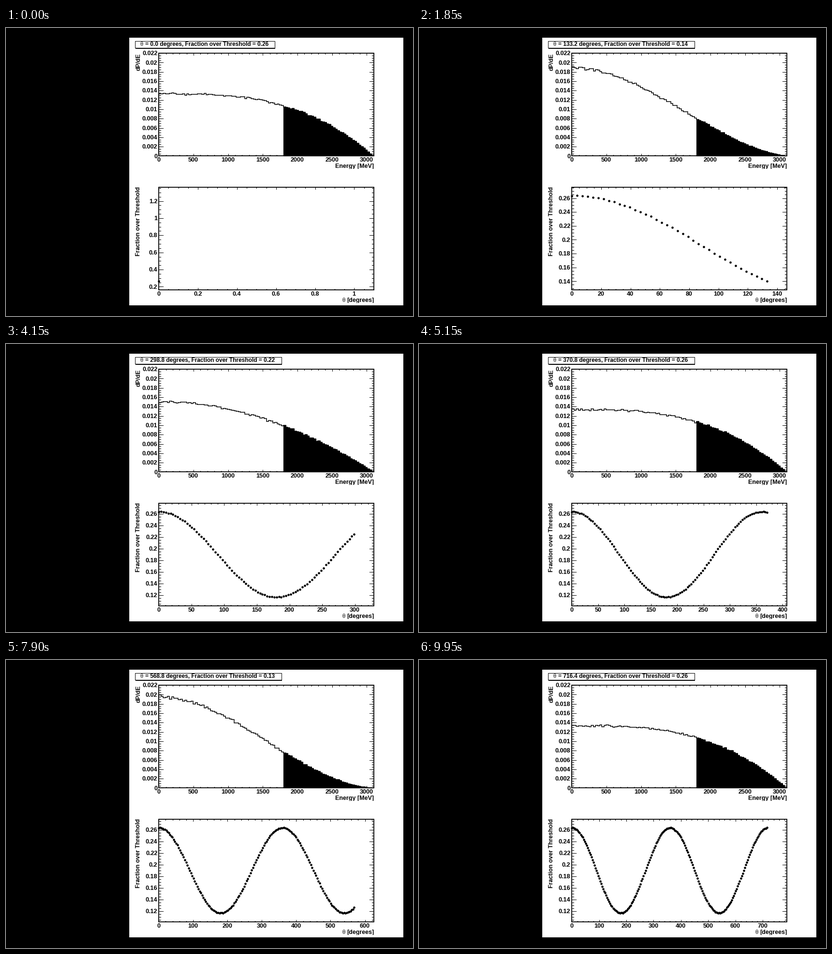
These frames come from a looping animation (842 px wide and 595 px high, 10000 ms). A matplotlib script:

```python
import math

import matplotlib.pyplot as plt
import numpy as np
from matplotlib.animation import FuncAnimation
from matplotlib.collections import LineCollection
from matplotlib.patches import Rectangle

W, H, DPI = 842, 595, 100
FRAMES, INTERVAL = 200, 50
STEP_DEG = 3.6

LEFT, RIGHT = 316.24, 760.76
TOP_PLOT = (52.07, 264.42)      # top and bottom edge in pixels
LOW_PLOT = (328.57, 540.93)

E_AXIS, E_END, P_AXIS = 3100, 3094, 0.022
BINS, FIRST_FILLED = 100, 58
EVENTS = 1e6


def px(size):
    """Pixels to points."""
    return size * 72 / DPI


def nice_ticks(lo, hi, wanted):
    """Round step of 1, 2 or 5 times a power of ten, and its multiples in range."""
    n = wanted
    while True:
        raw = (hi - lo) / n
        power = 10.0 ** math.floor(math.log10(raw) + 1e-9)
        lead = next(m for m in (1, 2, 5, 10) if raw / power <= m + 1e-6)
        step = lead * power
        bins = int(hi / step + 1.00001) - int(lo / step)
        if wanted <= 5 or 2 * bins != wanted:
            break
        n += 1
    return step, multiples(lo, hi, step)


def multiples(lo, hi, step):
    first = math.ceil(lo / step - 1e-6)
    last = math.floor(hi / step + 1e-6)
    return [i * step for i in range(first, last + 1)]


def all_ticks(lo, hi):
    step, major = nice_ticks(lo, hi, 10)
    sub, _ = nice_ticks(0, step, 5)
    return major, multiples(lo, hi, sub)


def scale(v, lo, hi, a, b):
    return a + (b - a) * (np.asarray(v) - lo) / (hi - lo)


# Physics: decay spectrum whose asymmetry follows the cosine of the angle
angles = STEP_DEG * np.arange(FRAMES)
wobble = np.sin(2.3 * np.arange(FRAMES) ** 2)
fractions = 0.19 + 0.0735 * np.cos(np.radians(angles)) + 0.0005 * wobble


def spectrum(k):
    y = np.minimum((np.arange(BINS) + 0.5) * E_AXIS / BINS / E_END, 1)
    flat = 5 / 3 - 3 * y**2 + 4 / 3 * y**3
    skew = 1 / 3 - 3 * y**2 + 8 / 3 * y**3
    p = (flat - math.cos(math.radians(angles[k])) * skew) / BINS
    p = np.maximum(p, 0)
    noise = np.random.default_rng(k).normal(size=BINS)
    return np.maximum(p + noise * np.sqrt(p / EVENTS), 0)


fig = plt.figure(figsize=(W / DPI, H / DPI), dpi=DPI, facecolor="black")
ax = fig.add_axes([0, 0, 1, 1])
ax.set_xlim(0, W)
ax.set_ylim(H, 0)
ax.axis("off")


def box(x0, y0, x1, y1, face, edge="none", width=0, z=1):
    patch = Rectangle((x0, y0), x1 - x0, y1 - y0, facecolor=face,
                      edgecolor=edge, linewidth=px(width), zorder=z)
    return ax.add_patch(patch)


def label(x, y, text, ha="left", size=12.5, **kw):
    style = dict(family="Liberation Sans", weight="bold", va="baseline", zorder=4)
    style.update(kw)
    return ax.text(x, y, text, ha=ha, fontsize=px(size), color="black", **style)


def theta(x, y, size=12.5):
    return label(x, y, "θ", size=size, family="Liberation Serif", weight="normal")


def side_title(y, text):
    label(277, y, text, "right", rotation=90, rotation_mode="anchor")


class Axes:
    """Frame, ticks on all four sides and number labels of one plot."""

    def __init__(self, top, bottom):
        self.top, self.bottom = top, bottom
        self.texts = []
        self.ticks = LineCollection([], colors="black", linewidths=px(1),
                                    antialiaseds=False, zorder=3)
        ax.add_collection(self.ticks)
        box(LEFT, top, RIGHT, bottom, "none", "black", 1.8, 3)

    def set_range(self, x_lo, x_hi, y_lo, y_hi):
        for t in self.texts:
            t.remove()
        self.texts = []
        lines = []
        x_major, x_all = all_ticks(x_lo, x_hi)
        y_major, y_all = all_ticks(y_lo, y_hi)
        for values, size in ((x_all, 2), (x_major, 4)):
            for x in scale(values, x_lo, x_hi, LEFT, RIGHT):
                lines.append([(x, self.bottom), (x, self.bottom - size)])
                lines.append([(x, self.top), (x, self.top + size)])
        for values, size in ((y_all, 4.2), (y_major, 8.3)):
            for y in scale(values, y_lo, y_hi, self.bottom, self.top):
                lines.append([(LEFT, y), (LEFT + size, y)])
                lines.append([(RIGHT, y), (RIGHT - size, y)])
        self.ticks.set_segments(lines)
        for v in x_major:
            x = scale(v, x_lo, x_hi, LEFT, RIGHT) - 0.3
            self.texts.append(label(x, self.bottom + 12, f"{round(v, 6):g}", "center"))
        for v in y_major:
            y = scale(v, y_lo, y_hi, self.bottom, self.top) + 4.2
            self.texts.append(label(313.3, y, f"{round(v, 6):g}", "right"))


# Static parts
box(255, 20, 822, 573, "white", z=0)
upper, lower = Axes(*TOP_PLOT), Axes(*LOW_PLOT)
upper.set_range(0, E_AXIS, 0, P_AXIS)
side_title(52, "dP/dE")
side_title(328, "Fraction over Threshold")
label(761, 289, "Energy [MeV]", "right")
label(761, 566, "[degrees]", "right")
theta(695, 566, 13)
# Pad edges cut the descenders
box(660, 291, 800, 296, "white", z=5)
box(660, 568, 800, 572, "white", z=5)

# Moving parts
shadow = box(268, 28, 557, 42.5, "black", z=1)
frame = box(266.5, 26.5, 555.5, 40.5, "white", "black", 1, 2)
theta(277.5, 37)
title = label(288, 37, "", size=11.95)
outline, = ax.plot([], [], color="black", lw=px(1.5), zorder=2,
                   solid_joinstyle="miter")
fill, = ax.fill([0, 0, 0], [0, 0, 0], color="black", lw=px(1.2), zorder=2)
dots, = ax.plot([], [], "o", color="black", ms=px(4.6), mew=0, zorder=4)

edges = np.linspace(LEFT, RIGHT, BINS + 1)
step_x = np.repeat(edges, 2)[1:-1]


def update(k):
    number = f"{angles[k]:.1f}"
    title.set_text(f"= {number} degrees, Fraction over Threshold = {fractions[k]:.2f}")
    right = 555.5 + 7 * (len(number) - 3)
    frame.set_width(right - 266.5)
    shadow.set_width(right + 1.5 - 268)

    base = TOP_PLOT[1]
    step_y = np.repeat(scale(spectrum(k), 0, P_AXIS, base, TOP_PLOT[0]), 2)
    outline.set_data(np.r_[LEFT, step_x], np.r_[base, step_y])
    cut = 2 * FIRST_FILLED
    xs = np.r_[step_x[cut], step_x[cut:], RIGHT]
    ys = np.r_[base, step_y[cut:], base]
    fill.set_xy(np.column_stack([xs, ys]))

    shown = fractions[:k + 1]
    x_max = 1.1 * (angles[k] if k else 1)
    y_min, y_max = shown.min(), shown.max()
    if k == 0:
        y_max = y_min + 1
    pad = 0.1 * (y_max - y_min)
    y_lo, y_hi = y_min - pad, y_max + pad
    lower.set_range(0, x_max, y_lo, y_hi)
    dots.set_data(scale(angles[:k + 1], 0, x_max, LEFT, RIGHT),
                  scale(shown, y_lo, y_hi, LOW_PLOT[1], LOW_PLOT[0]))
    return []


anim = FuncAnimation(fig, update, frames=FRAMES, interval=INTERVAL,
                     repeat=True, repeat_delay=0, blit=False)
plt.show()
```
